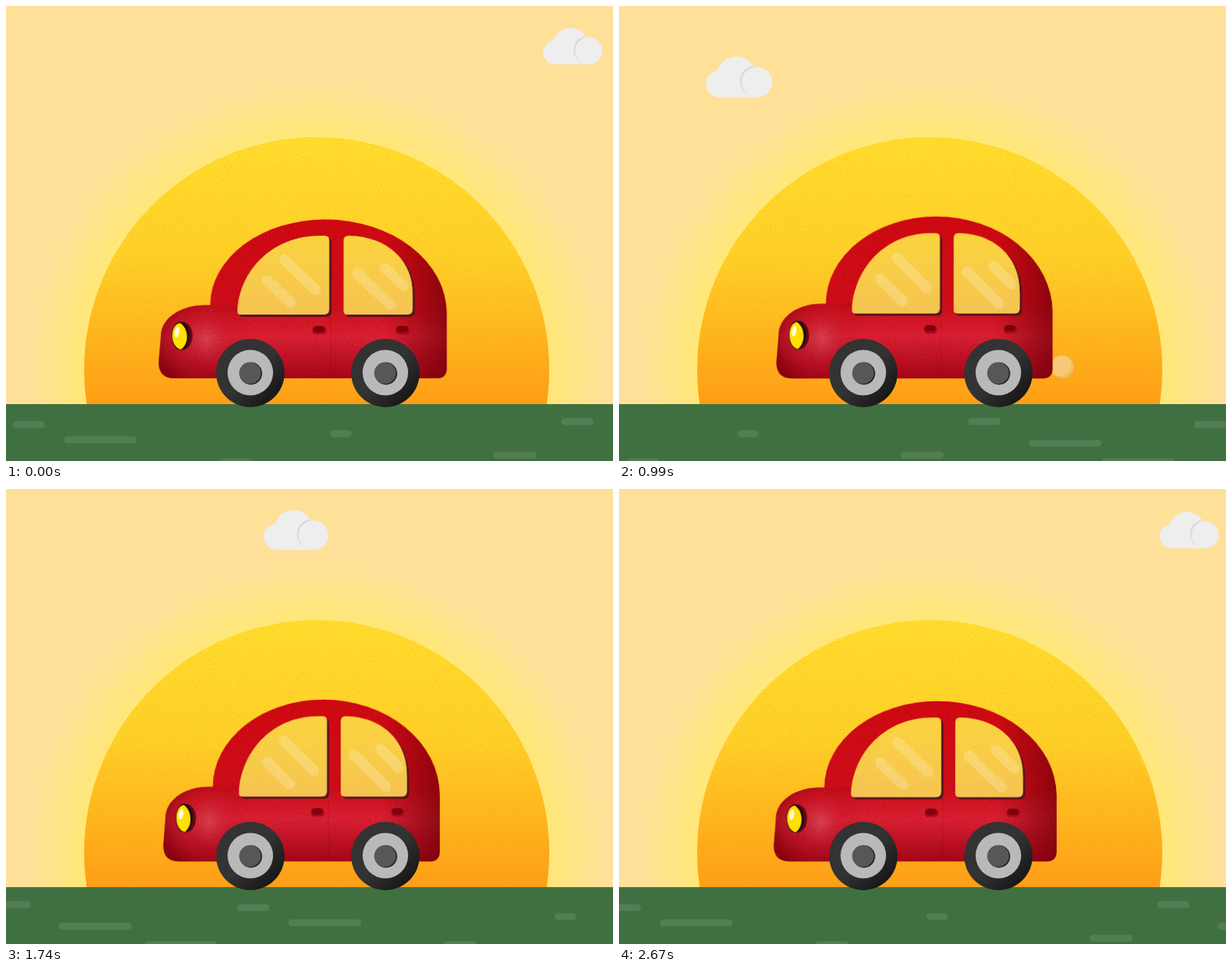
These frames come from a looping animation (800x600 px, 2.7 s). An HTML page:

```html
<!DOCTYPE html>
<html lang="en">
<head>
<meta charset="utf-8">
<title>Sunset drive</title>
<style>
  html, body { margin: 0; width: 100%; height: 100%; overflow: hidden; background: #ffe099; }
  svg { display: block; width: 800px; height: 600px; }
  #body { transform-origin: 353px 491px; }
</style>
</head>
<body>
<svg id="stage" viewBox="0 0 800 600" xmlns="http://www.w3.org/2000/svg">
  <defs>
    <radialGradient id="glow" gradientUnits="userSpaceOnUse" cx="409.5" cy="479.5" r="380">
      <stop offset=".805" stop-color="#ffe778"/>
      <stop offset=".88" stop-color="#ffe584"/>
      <stop offset="1" stop-color="#ffe099"/>
    </radialGradient>
    <linearGradient id="sunFill" gradientUnits="userSpaceOnUse" x1="0" y1="173" x2="0" y2="525">
      <stop offset="0" stop-color="#ffe130"/>
      <stop offset=".45" stop-color="#ffd32a"/>
      <stop offset="1" stop-color="#ff9f18"/>
    </linearGradient>
    <linearGradient id="red" gradientUnits="userSpaceOnUse" x1="0" y1="281" x2="0" y2="491">
      <stop offset="0" stop-color="#d90a13"/>
      <stop offset=".55" stop-color="#d60f1b"/>
      <stop offset=".74" stop-color="#e22236"/>
      <stop offset="1" stop-color="#ac0619"/>
    </linearGradient>
    <linearGradient id="rear" gradientUnits="userSpaceOnUse" x1="500" y1="0" x2="581" y2="0">
      <stop offset="0" stop-color="#700008" stop-opacity="0"/>
      <stop offset="1" stop-color="#700008" stop-opacity=".65"/>
    </linearGradient>
    <radialGradient id="hoodFill" gradientUnits="userSpaceOnUse" cx="266" cy="440" r="68">
      <stop offset="0" stop-color="#e4606c" stop-opacity=".6"/>
      <stop offset=".5" stop-color="#c01a30" stop-opacity=".3"/>
      <stop offset="1" stop-color="#780008" stop-opacity=".6"/>
    </radialGradient>
    <linearGradient id="fade" gradientUnits="userSpaceOnUse" x1="262" y1="0" x2="318" y2="0">
      <stop offset="0" stop-color="#fff"/>
      <stop offset="1" stop-color="#000"/>
    </linearGradient>
    <linearGradient id="glass" gradientUnits="userSpaceOnUse" x1="0" y1="303" x2="0" y2="407">
      <stop offset="0" stop-color="#e8dcb8" stop-opacity=".16"/>
      <stop offset="1" stop-color="#e4d4b4" stop-opacity=".34"/>
    </linearGradient>
    <linearGradient id="tyre" x1="0" y1="0" x2="1" y2="1">
      <stop offset=".5" stop-color="#333"/>
      <stop offset=".9" stop-color="#141414"/>
    </linearGradient>
    <filter id="orangeGrain" x="0" y="0" width="1" height="1" color-interpolation-filters="sRGB">
      <feTurbulence type="fractalNoise" baseFrequency=".8" numOctaves="2" seed="4"/>
      <feColorMatrix values="0 0 0 0 .96  0 0 0 0 .58  0 0 0 0 0  2.4 0 0 0 -1.05"/>
    </filter>
    <filter id="redGrain" x="0" y="0" width="1" height="1" color-interpolation-filters="sRGB">
      <feTurbulence type="fractalNoise" baseFrequency=".8" numOctaves="2" seed="9"/>
      <feColorMatrix values="0 0 0 0 .3  0 0 0 0 0  0 0 0 0 .02  2.4 0 0 0 -1.05"/>
    </filter>

    <path id="shell" d="M222 491Q201 491 201 470L204 435C204 412 230 394.5 262 394.5H269A152 113 0 0 1 421 281.5A160 124 0 0 1 581 405V478Q581 491 568 491Z"/>
    <path id="hood" d="M222 491Q201 491 201 470L204 435C204 412 230 394.5 262 394.5H320V491Z"/>
    <path id="panes" d="M305 403C307 350 350 303 414 303H420Q426 303 426 309V400Q426 407 419 407H309Q305 407 305 403ZM445 309Q445 303 452 303C505 304 537 338 536 380V400Q536 407 529 407H450Q445 407 445 402Z"/>
    <g id="handle">
      <rect x="404" y="423" width="18" height="10" rx="4" fill="#a80a1c"/>
      <rect x="405" y="422" width="15" height="8" rx="4" fill="#7c000c"/>
    </g>
    <g id="wheel">
      <circle r="45" fill="url(#tyre)"/>
      <circle r="30" cy="-.5" fill="#b9b9b9"/>
      <circle r="14.8" cx=".8" cy=".6" fill="#222"/>
      <circle r="14.3" cx="-.4" fill="#575757"/>
    </g>
    <g id="cloud">
      <circle cx="-23" cy="-16" r="16"/>
      <circle cx="-3" cy="-24" r="24"/>
      <rect x="-23" y="-20" width="44" height="20"/>
      <circle cx="19.4" cy="-19.2" r="18.2" fill="#d8d8d8" clip-path="url(#lumpClip)"/>
      <circle cx="21" cy="-18" r="18"/>
    </g>
    <g id="puff">
      <circle r="1" fill="#e3cd9e"/>
      <circle cx="-.2" cy="-.17" r=".98" fill="#f3deb2" clip-path="url(#puffClip)"/>
    </g>

    <clipPath id="lumpClip">
      <circle cx="-3" cy="-24" r="24"/>
      <rect x="-23" y="-20" width="36" height="20"/>
    </clipPath>
    <clipPath id="puffClip"><circle r="1"/></clipPath>
    <clipPath id="sunClip"><circle cx="409.5" cy="479.5" r="306.5"/></clipPath>
    <clipPath id="shellClip"><use href="#shell"/></clipPath>
    <clipPath id="paneClip"><use href="#panes"/></clipPath>
    <clipPath id="sky"><rect y="16" width="800" height="520"/></clipPath>
    <mask id="holes" maskUnits="userSpaceOnUse" x="190" y="270" width="400" height="230">
      <rect x="190" y="270" width="400" height="230" fill="#fff"/>
      <use href="#panes"/>
    </mask>
    <mask id="hoodMask" maskUnits="userSpaceOnUse" x="190" y="380" width="140" height="120">
      <rect x="190" y="380" width="140" height="120" fill="url(#fade)"/>
    </mask>
  </defs>

  <rect width="800" height="600" fill="#ffe099"/>
  <circle cx="409.5" cy="479.5" r="380" fill="url(#glow)"/>
  <circle cx="409.5" cy="479.5" r="306.5" fill="url(#sunFill)"/>
  <g clip-path="url(#sunClip)" opacity=".36">
    <rect x="103" y="173" width="614" height="353" filter="url(#orangeGrain)"/>
  </g>

  <g clip-path="url(#sky)" fill="#eee">
    <use id="cloudA" href="#cloud"/>
    <use id="cloudB" href="#cloud"/>
  </g>

  <ellipse id="bush" rx="42" ry="22" fill="#58a80a"/>
  <rect y="525" width="800" height="75" fill="#407041"/>
  <g id="road" fill="#fff" fill-opacity=".1"></g>
  <g id="puffs"></g>

  <g id="body">
    <g mask="url(#holes)">
      <use href="#shell" fill="url(#red)"/>
      <use href="#shell" fill="url(#rear)"/>
      <use href="#hood" fill="url(#hoodFill)" mask="url(#hoodMask)"/>
      <g clip-path="url(#shellClip)" opacity=".36">
        <rect x="200" y="280" width="382" height="212" filter="url(#redGrain)"/>
      </g>
      <use href="#panes" x="3" y="3" fill="#54161e"/>
    </g>
    <use href="#panes" fill="url(#glass)"/>
    <g clip-path="url(#paneClip)" stroke="#fff" stroke-opacity=".2" stroke-width="14" stroke-linecap="round">
      <path d="M367 335L408 374M344 362L375 391M463 353L507 394M500 346L524 369"/>
    </g>
    <path d="M428 411V491" stroke="#70000c" stroke-opacity=".2"/>
    <use href="#handle"/>
    <use href="#handle" x="110"/>
    <g transform="translate(-.7 0)">
      <ellipse cx="233" cy="435" rx="13.5" ry="18.5" fill="#5c0a14"/>
      <ellipse cx="230.5" cy="435" rx="11.5" ry="18.5" fill="#26080a"/>
      <path d="M230 418C216 420 216 450 231 453C242 446 242 426 230 418Z" fill="#ffe000"/>
      <ellipse cx="226" cy="430" rx="3.2" ry="7" fill="#fff" fill-opacity=".85" transform="rotate(12 226 430)"/>
    </g>
  </g>
  <use href="#wheel" x="322" y="484"/>
  <use href="#wheel" x="500" y="484"/>
</svg>

<script>
const LOOP = 2700;
const NS = 'http://www.w3.org/2000/svg';
const $ = id => document.getElementById(id);

function add(parent, tag, attrs) {
  const el = document.createElementNS(NS, tag);
  for (const k in attrs) el.setAttribute(k, attrs[k]);
  return parent.appendChild(el);
}

// rows: [ms, x, y, scale, opacity]
function move(el, rows, delay = 0) {
  const frames = rows.map(([ms, x, y, k = 1, opacity = 1]) => ({
    offset: ms / LOOP,
    transform: `translate(${x}px, ${y}px) scale(${k})`,
    opacity
  }));
  el.animate(frames, { duration: LOOP, iterations: Infinity, delay });
}

// Dashes: left edge, centre line, width
const dashes = [
  [-122, 601, 96], [0, 552, 43], [68, 572, 96], [273, 601, 43],
  [419, 564, 28], [634, 592.5, 57], [723, 548, 43], [803, 576.5, 96]
];
function strip(rows) {
  const g = add($('road'), 'g', {});
  for (const [x, y, width] of dashes)
    add(g, 'rect', { x, y: y - 4.5, width, height: 9, rx: 4.5 });
  move(g, rows);
}
strip([[0, 8.5, 0], [1350, 1029.5, 0], [1350, -1036, 0], [LOOP, 8.5, 0]]);
strip([[0, -1012.5, 0], [LOOP, 1029.5, 0]]);

const size = w => w / 78;
move($('cloudA'), [
  [0, -190, 138.8, size(98.6)],
  [1443, 317, 112, size(82)],
  [LOOP, 592, -21.8, size(94.5)]
]);
move($('cloudB'), [
  [0, 747, 77, 1], [29, 742.5, 75.8, 1], [29, 900, 106, 1],
  [1900, 870.6, 110, size(71.9)], [LOOP, 747, 77, 1]
]);

move($('bush'), [
  [0, 116, 550], [420, 116, 550], [510, 184, 543], [600, 252, 541],
  [690, 320, 543], [780, 388, 550], [LOOP, 388, 550]
]);

// Exhaust
const drift = [
  [0, 559.5, 492, 7, 0], [50, 570, 485.5, 10, .35], [116, 584, 476, 15, .6],
  [300, 623, 451, 19, 1], [353, 634, 444, 19.3, 1], [410, 646, 438, 17.5, .8],
  [510, 667, 420, 11.5, .3], [550, 676, 414, 8, 0], [LOOP, 676, 414, 8, 0]
];
for (const start of [90, 247, 874, 1147, 1900])
  move(add($('puffs'), 'use', { href: '#puff' }), drift, start - LOOP);

$('body').animate(
  [{ transform: 'scale(1.0031, .9987)' }, { transform: 'scale(.9252, 1.0325)' }],
  { duration: 225, iterations: Infinity, direction: 'alternate', easing: 'ease', delay: -435 }
);
</script>
</body>
</html>
```
